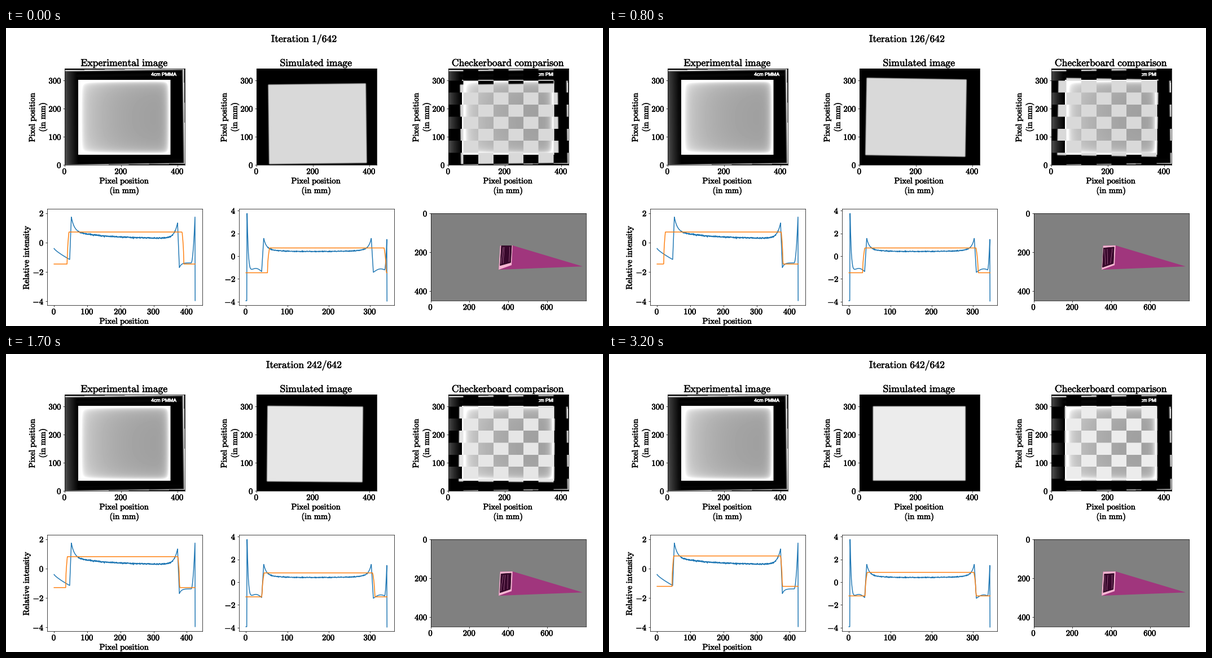
Write a matplotlib script that moves like this. It is 1058 px wide and 529 px high and loops after 4800 ms.

```python
import numpy as np
import matplotlib.pyplot as plt
from matplotlib.animation import FuncAnimation
from matplotlib.patches import Polygon, Rectangle
from matplotlib.patheffects import withStroke

plt.rcParams.update({
    "mathtext.fontset": "cm", "font.family": "DejaVu Sans", "font.size": 20,
    "axes.linewidth": 1.0, "xtick.major.width": 1.0, "ytick.major.width": 1.0,
    "text.hinting": "none",
})

W, H = 1058, 529
PITCH = 340
NX, NY = 426, 342
LAST = 32
BLUE, ORANGE = "#1f77b4", "#ff7f0e"

Y, X = np.indices((NY, NX)) + 0.5
CHECKER = (Y // (NY / 8) + X // (NX / 8)) % 2 == 0

# key poses of the plate, in screen pixels from the axes corner
COUNT = ((0, 4, 8, 14, 20, 24, LAST), (1, 15, 126, 202, 282, 446, 642))
STEPS = (0, 4, 8, 14, 20, LAST)
TRACKS = {
    "cx": (108, 101.8, 100, 102, 105, 105.8),
    "cy": (98, 90, 86.5, 87.8, 87.8, 86.8),
    "width": (175.5, 177.5, 179.5, 175.5, 167.5, 166),
    "height": (143.5, 142.5, 139.5, 138.5, 134, 134),
    "angle": (-.012, -.052, .017, .016, 0, 0),
}


def ramp(x, start, length):
    return np.clip((x - start) / length, 0, 1)


def fade(d, length):
    return np.exp(-np.maximum(d, 0) / length)


def bump(x, start, length):
    return np.sin(np.pi * ramp(x, start, length))


def row_plate(x):
    near, far = x - 52, 372 - x
    return 0.27 + 0.5 * fade(near, 100) + 0.97 * fade(near, 9) + 1.05 * fade(far, 10)


def row_back(x):
    left = -0.4 - 0.75 * ramp(x, 0, 47) ** 0.8
    right = -1.38 - 0.32 * fade(x - 377.5, 6) + 3.4 * ramp(x, 413, 12) ** 2
    return np.where(x < NX / 2, left, right)


def col_plate(y):
    near, far = y - 43, 303 - y
    return 0.41 + sum(0.3 * fade(d, 25) + 0.85 * fade(d, 6) for d in (near, far))


def col_back(y):
    top = -1.35 + 5.1 * fade(y - 3, 2.6) + 0.27 * bump(y, 10, 28)
    low = -1.42 + 0.3 * bump(y, 308, 36) + 2.8 * ramp(y, 335, 5.5) ** 2
    return np.where(y < 2.5, -3.92, np.where(y < NY / 2, top, low))


def row_profile(x):
    mask = ramp(x, 47, 5) * ramp(-x, -377.5, 5.5)
    return row_back(x) + (row_plate(x) - row_back(x)) * mask


def col_profile(y):
    mask = ramp(y, 38, 5) * ramp(-y, -308, 5)
    return col_back(y) + (col_plate(y) - col_back(y)) * mask


def measured():
    tilt = 0.014
    xs, ys = X - tilt * (Y - NY / 2), Y + tilt * (X - NX / 2)
    img = np.maximum(row_back(xs), col_back(ys))
    img[(ys < 2) | (ys > 340.7) | (xs > 425.2)] = -4
    plate = (X > 48) & (X < 375.5) & (Y > 40) & (Y < 306)
    return np.where(plate, row_plate(X) + col_plate(Y) - 0.41, img)


def plate_corners(cx, cy, width, height, angle):
    x = np.array((-1, 1, 1, -1)) * width / 2
    y = np.array((-1, -1, 1, 1)) * height / 2
    c, s = np.cos(angle), np.sin(angle)
    return 2 * np.column_stack((cx + x * c - y * s, cy + x * s + y * c))


def simulated(corners, inside, outside, blur=5):
    cover = np.ones_like(X)
    for p, q in zip(corners, np.roll(corners, -1, axis=0)):
        dx, dy = q - p
        dist = (dx * (Y - p[1]) - dy * (X - p[0])) / np.hypot(dx, dy)
        cover *= np.sqrt(ramp(dist, 0, blur))
    return outside + (inside - outside) * cover


def gray(img, black, white):
    return ramp(img, black, white - black)


def halve(img):
    return img.reshape(NY // 2, 2, NX // 2, 2).mean(axis=(1, 3))


def tex(s):
    return r"$\mathrm{" + s.replace(" ", r"\ ") + "}$"


def put(x, y, s, size=20, turn=0):
    return fig.text(x / W, 1 - y / H, tex(s), size=size, ha="center",
                    va="baseline", rotation=turn, rotation_mode="anchor")


def add_axes(left, top, width, height, xticks, yticks):
    ax = fig.add_axes((left / W, 1 - (top + height) / H, width / W, height / H))
    ax.set_xticks(xticks, [f"${t}$" for t in xticks])
    ax.set_yticks(yticks, [f"${t}$" for t in yticks])
    return ax


def add_image(i, title):
    left = 104 + PITCH * i
    ax = add_axes(left, 72, 213, 171, range(0, 401, 200), range(0, 301, 100))
    im = ax.imshow(np.zeros((NY // 2, NX // 2)), cmap="gray", vmin=0, vmax=1,
                   extent=(0, NX, 0, NY), aspect="auto", interpolation="nearest")
    put(left + 106, 67.5, title, 24)
    put(left + 106, 276, "Pixel position")
    put(left + 106, 293, "(in mm)")
    put(left - 53, 158, "Pixel position", turn=90)
    put(left - 34.5, 158, "(in mm)", turn=90)
    return ax, im


def stamp(ax):
    return ax.text(351, 316, "4cm PMMA", color="white", size=11.8, ha="center",
                   va="baseline", family="Liberation Sans")


def add_profile(i, profile, n, ylim, xticks, yticks):
    ax = add_axes(72.7 + PITCH * i, 321, 275, 171, xticks, yticks)
    x = np.arange(0, n - 1, 0.5)
    y = profile(x)
    noise = np.random.default_rng(i).normal(0, 0.022, x.size)
    y += noise * (np.abs(y - 0.5) < 0.3)
    ax.plot(np.append(x, n - 1), np.append(y, -3.95), color=BLUE, lw=2)
    line, = ax.plot([], [], color=ORANGE, lw=2)
    ax.set_xlim(-0.05 * (n - 1), 1.05 * (n - 1))
    ax.set_ylim(*ylim)
    return line


fig = plt.figure(figsize=(20, 10), dpi=52.9, facecolor="white")
heading = put(528.5, 24.8, "Iteration 1/642", 24)

ax_exp, im_exp = add_image(0, "Experimental image")
ax_sim, im_sim = add_image(1, "Simulated image")
ax_mix, im_mix = add_image(2, "Checkerboard comparison")

EXP = gray(measured(), -1.15, 1.18)
im_exp.set_data(halve(EXP))
stamp(ax_exp)
tile = Rectangle((6 * NX / 8, 7 * NY / 8), NX / 8, NY / 8, transform=ax_mix.transData)
stamp(ax_mix).set_clip_path(tile)
ax_mix.texts[0].set_clip_on(True)

row_line = add_profile(0, row_profile, NX, (-4.26, 2.3), range(0, 401, 100), range(-4, 3, 2))
col_line = add_profile(1, col_profile, NY, (-4.31, 4.16), range(0, 301, 100), range(-4, 5, 2))
put(210, 525, "Pixel position")
put(40.5, 407, "Relative intensity", turn=90)

# 3D view: source, beam, detector and plate
view = add_axes(72.7 + 2 * PITCH, 329, 275, 155, range(0, 601, 200), range(0, 401, 200))
view.set(xlim=(0, 800), ylim=(450, 0), facecolor="#808080")
SOURCE = np.array((783, 273.5))
DET = np.array([(350.5, 290.5), (417, 267), (422, 165.5), (358, 167)])


def on_detector(quad, u, v):
    u, v = np.asarray(u)[..., None], np.asarray(v)[..., None]
    low = quad[0] * (1 - u) + quad[1] * u
    top = quad[3] * (1 - u) + quad[2] * u
    return low * (1 - v) + top * v


view.add_patch(Polygon([DET[3], DET[2], SOURCE, DET[0]], fc="#a0367d", ec="none"))
view.add_patch(Polygon(DET, fc="#f6b4d2", ec="none"))
plate = view.add_patch(Polygon(DET, fc="#38082c", ec="#1c0416", lw=1))
streaks, = view.plot([], [], color="#e59cc4", lw=0.9, alpha=0.7)


def update(frame):
    step = min(frame, LAST)
    pose = {name: np.interp(step, STEPS, keys) for name, keys in TRACKS.items()}
    corners = plate_corners(**pose)
    lift = ramp(step, 8, 12) ** 1.4
    sim = simulated(corners, 0.72 + 0.14 * lift, -1.46 + 0.25 * lift)
    shown = gray(sim, -0.87, 1)

    heading.set_text(tex(f"Iteration {round(np.interp(step, *COUNT))}/642"))
    im_sim.set_data(halve(shown))
    im_mix.set_data(halve(np.where(CHECKER, EXP, shown)))
    row_line.set_data(np.arange(NX), sim[NY // 2])
    col_line.set_data(np.arange(NY), sim[:, NX // 2])

    quad = on_detector(DET, corners[:, 0] / NX, corners[:, 1] / NY)
    plate.set_xy(quad)
    rng = np.random.default_rng(step)
    path = []
    for a in (0.15, 0.4, 0.75):
        ends = a + rng.uniform(-0.12, 0.12, 2)
        path += [*on_detector(quad, ends, (0.92, 0.08)), (np.nan, np.nan)]
    streaks.set_data(*np.array(path).T)
    return []


# slightly heavier lettering
for text in fig.findobj(plt.Text):
    text.set_path_effects([withStroke(linewidth=0.8, foreground=text.get_color())])

anim = FuncAnimation(fig, update, frames=48, interval=100, repeat=True,
                     repeat_delay=0, init_func=lambda: update(0))
plt.show()
```
